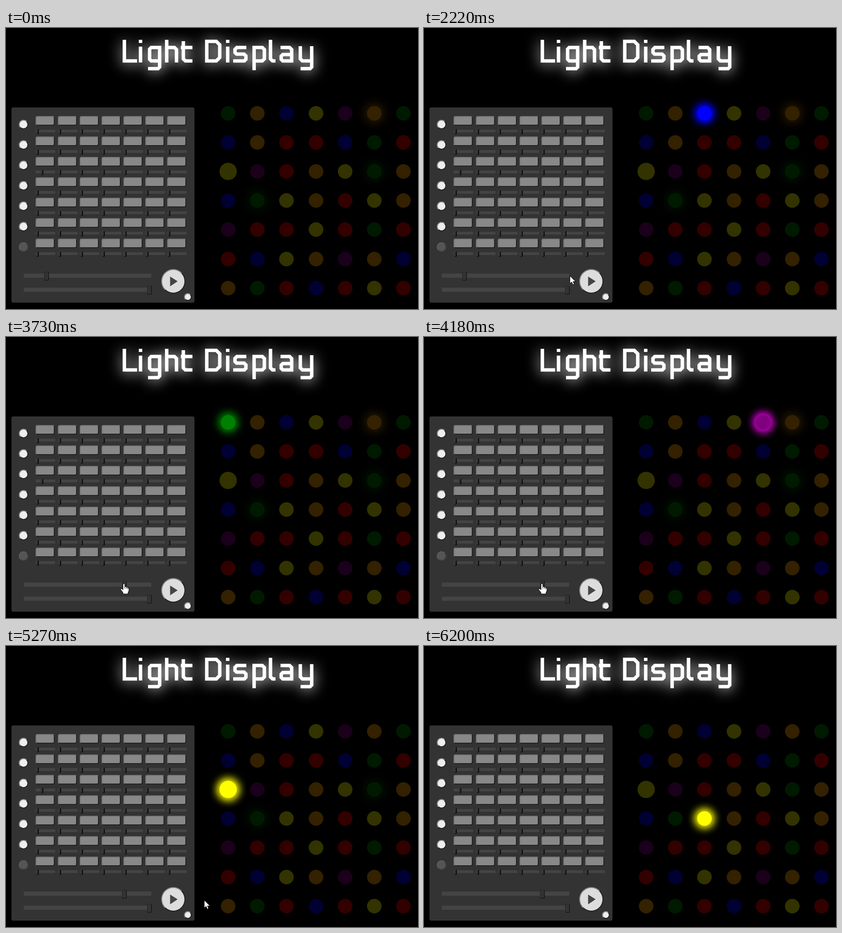
Animation of 905 by 619 pixels, one loop 6.28 s. Source, as an HTML page:

```html
<!DOCTYPE html>
<html lang="en">
<head>
<meta charset="utf-8">
<title>Light Display</title>
<style>
  html, body { margin: 0; width: 100%; height: 100%; overflow: hidden; background: #000; }
  #stage { position: absolute; left: 0; top: 0; width: 905px; height: 619px; overflow: hidden; background: #000; }
  #stage div, #stage svg { position: absolute; box-sizing: border-box; }
  h1 {
    position: absolute; left: 250px; top: 16px; width: 430px; margin: 0;
    font: 64px/72px Roboto, sans-serif; text-align: center; white-space: nowrap; color: transparent;
  }
  #title {
    left: 0; top: 0; fill: none; stroke: #fff; stroke-width: 7.6;
    filter: drop-shadow(0 3px 15px #fff);
  }
  #panel { left: 11.5px; top: 175px; width: 402px; height: 430px; border-radius: 4px; background: #333; }
  .pad { width: 42px; height: 21.5px; border-radius: 4px; background: #888; border: 2px solid; border-color: #767676 #222 #222 #767676; }
  .track { background: #444; }
  .thumb { background: #333; border: solid; border-color: #3a3a3a #080808 #080808 #3a3a3a; border-radius: 2px; }
  .small { width: 6px; height: 12px; border-width: 1px 2px 1px 1px; }
  .big { width: 10px; height: 19px; border-width: 1.5px; border-color: #222 #080808 #080808 #222; }
  .round { border-radius: 50%; background: #eee; border: 2px solid; border-color: #888 #222 #222 #888; }
  .off { background: #555; border-color: #5c5c5c #444 #444 #5c5c5c; }
  #play { left: 340.5px; top: 531px; width: 53.5px; height: 54px; background: #ddd; }
  #play.pressed { border-color: #222 #888 #888 #222; }
  .light { width: 32px; height: 32px; border-radius: 50%; background: currentColor; opacity: .2; }
  .large { width: 38px; height: 38px; margin: -3px; }
  .warm { box-shadow: 0 0 24px 3px; }
  .lit { opacity: 1; --halo: var(--glow, currentColor); box-shadow: 0 0 20px 2px var(--halo), 0 0 20px 2px var(--halo); }
  .cursor { left: 0; top: 0; overflow: visible; fill: #fff; stroke: #000; stroke-width: 1; }
</style>
</head>
<body>
<div id="stage">
  <h1>Light Display</h1>
  <svg id="title" width="905" height="150" aria-hidden="true">
    <path d="M260 26V72.5H288 M295.500 26v7m0 8V76
      M337.500 72.500H319L315.500 69V46.500L319 43H337.500V86L334 89.500H312
      M353 26V76M353 43H370L374.500 47.500V76
      M389.500 29V68L394 72.500H409.500M384 43H409.500
      M441 29.500H462L469.500 37V65L462 72.500H441Z
      M487 26v7m0 8V76
      M528 43H507L503 47V54L506.500 57.500H523L527 61.500V69L523.500 72.500H499
      M545 93V43H563L567.500 47.500V68L563 72.500H545
      M581 26V68L585.500 72.500H592
      M603 43H623L627.500 47.500V72.500H608L604.500 69V62L608 58.500H627
      M646.500 40V68L651 72.500H671M671.500 40V86L668 89.500H647"/>
  </svg>
  <div id="panel"></div>
  <div id="play" class="round">
    <svg width="50" height="50" style="left:0;top:0"><path d="M17.500 14.500L34 25 17.500 36Z" fill="#444"/></svg>
  </div>
</div>
<script>
  const LOOP = 6280, FRAME = 76;
  const stage = document.getElementById('stage');
  const play = document.getElementById('play');

  function add(cls, x, y, w, h) {
    const el = document.createElement('div');
    el.className = cls;
    el.style.left = x + 'px';
    el.style.top = y + 'px';
    if (w) el.style.width = w + 'px';
    if (h) el.style.height = h + 'px';
    stage.append(el);
    return el;
  }

  // Control panel
  for (let r = 0; r < 7; r++) {
    const y = 193.5 + r * 45;
    add(r < 6 ? 'round' : 'round off', 28, y + 8.5, 21, 21);
    for (let c = 0; c < 7; c++) {
      const x = 65.45 + c * 48.1;
      add('pad', x, y);
      add('track', x, y + 30.5, 43, 6);
      add('thumb small', x + (r === 2 && c === 0 ? 11 : 1), y + 28.5);
    }
  }
  add('track', 38.5, 541, 280, 9);
  add('track', 38.5, 572, 280, 9);
  const speed = add('thumb big', 84, 536.5);
  add('thumb big', 309.5, 567.5);
  add('round', 391, 583.5, 17, 17);

  // Lights
  const palette = { g: '#008000', o: '#ffa500', b: '#00f', y: '#ff0', p: '#800080', r: '#f00' };
  const colours = 'gobypog' + 'borrbgr' + 'yproygo' + 'bgyoryo' + 'prryrgr' + 'rbyopob' + 'ogrbryr';
  const lights = [...colours].map((key, i) => {
    const el = add('light', 472 + (i % 7) * 64.2, 171.5 + Math.floor(i / 7) * 64.2);
    el.style.color = palette[key];
    if (key === 'p') el.style.setProperty('--glow', '#e0e');
    return el;
  });
  lights[14].classList.add('large');

  // Slow run, then a restart at the higher speed
  const CLICK = 1130, SLOW = 440, CHANGE = 3650, RESTART = 3730, FAST = 104.5;
  const fastTime = i => RESTART + FAST * i;
  function litIndex(t) {
    if (t >= RESTART) return Math.floor((t - RESTART) / FAST);
    if (t >= CLICK && t < CHANGE) return Math.floor((t - CLICK) / SLOW);
    return -1;
  }
  const warm = [5, 19, 22];

  // Mouse pointer: time, x, y
  const path = [
    [310, 707, 613], [920, 386, 557], [1020, 384, 556], [1913, 384, 556],
    [2220, 321, 547], [2610, 267, 545], [2680, 263, 545], [3080, 263, 545],
    [3230, 259, 543], [4925, 259, 543], [5350, 506, 568], [5660, 751, 612], [5730, 751, 612]
  ];
  function pointerAt(t) {
    const i = path.findIndex(p => p[0] > t) - 1;
    if (i < 0) return null;
    const [t0, x0, y0] = path[i], [t1, x1, y1] = path[i + 1];
    const k = Math.floor((t - t0) / FRAME) * FRAME / (t1 - t0);
    return [Math.round(x0 + (x1 - x0) * k), Math.round(y0 + (y1 - y0) * k)];
  }
  const isHand = t => (t >= 1020 && t < 1989) || (t >= 2680 && t < 5001);

  function addCursor(d, detail = '') {
    stage.insertAdjacentHTML('beforeend',
      `<svg class="cursor" width="24" height="26"><path d="${d}"/><path d="${detail}"/></svg>`);
    return stage.lastElementChild;
  }
  const arrow = addCursor('M-.5-1V16L3.500 12.500 6 18.500 9 17.200 6.500 11.500H12Z');
  const hand = addCursor(
    'M-2 1.500Q0-1.500 2 1.500V7Q5 5.500 5.500 8 8 7 8.500 9.500 11 9 11 11.500V16L9 20V23H-2V20L-7 13.500Q-7.500 10.500-4.500 11.500L-2 14Z',
    'M2 7v4M5.500 8v3.500M8.500 9.500v3');

  function place(el, pos, visible) {
    el.style.display = pos && visible ? '' : 'none';
    if (pos) el.style.transform = `translate(${pos[0]}px, ${pos[1]}px)`;
  }

  const start = performance.now();
  function draw() {
    const t = (performance.now() - start) % LOOP;
    const on = litIndex(t);
    lights.forEach((el, i) => el.classList.toggle('lit', i === on));
    warm.forEach(i => lights[i].classList.toggle('warm', t < fastTime(i)));
    play.classList.toggle('pressed', t >= 1095 && t < 1240);
    speed.style.left = (t >= CHANGE ? 255 : 84) + 'px';
    const pos = pointerAt(t);
    place(arrow, pos, !isHand(t));
    place(hand, pos, isHand(t));
    requestAnimationFrame(draw);
  }
  draw();
</script>
</body>
</html>
```
